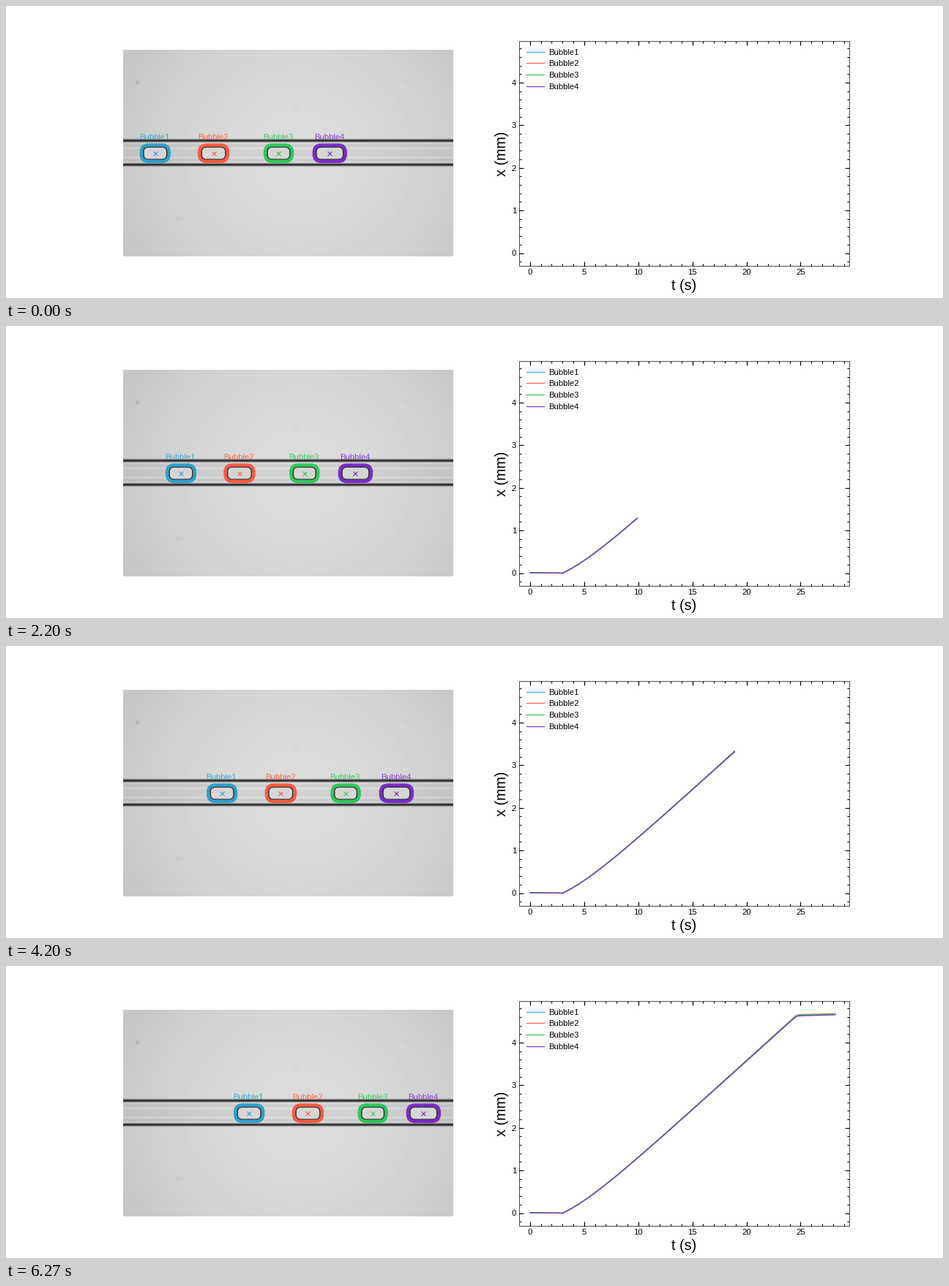
Recreate the animation shown at these times as a matplotlib script. Size 1280 by 400 pixels, loop 6340 ms.

```python
import numpy as np
import matplotlib.pyplot as plt
from matplotlib.animation import FuncAnimation
from matplotlib.patches import FancyBboxPatch, Rectangle
from matplotlib.transforms import Affine2D

plt.rcParams["font.family"] = "Liberation Sans"

LOOP, POSES, SUB, DT = 6340, 95, 3, 0.3  # SUB: ticks of the clock per pose
VIEW_SCALE = 27.6                        # camera pixels per mm
PT = 0.72                                # points per pixel
SMALL, LARGE = 8.1, 14.2
LEFT, RIGHT, TOP, BOTTOM = 701.1, 1152, 48, 356

# colour, start x, half width of the outline, relative speed
BUBBLES = [
    ("#2f9fcb", 203.5, 18.9, 1.001),
    ("#fb5a43", 283.3, 19.4, 1.0045),
    ("#2fc758", 372.2, 18.4, 1.003),
    ("#7a2dc6", 442.0, 21.4, 0.9985),
]


def px(t):
    return LEFT + (t + 1) * 14.783


def py(mm):
    return 338.5 - mm * 58.4


def position(t):
    """Rest, lagging start at 3 s, constant speed, soft stop near 24.5 s."""
    run = np.maximum(t - 3, 0)
    drive = 0.229 * run - 0.325 * (1 - np.exp(-run / 2.9))
    limit = 4.635 + 0.007 * (t - 25)
    soft = 0.015
    rest = 0.01 * np.maximum(1 - t / 3, 0)
    return rest - soft * np.logaddexp(-drive / soft, -limit / soft)


def photo():
    """Grey microscope view with a horizontal glass channel."""
    y, x = np.mgrid[60.5:343.5, 160.5:611.5]
    r2 = ((x - 400) / 240) ** 2 + ((y - 205) / 230) ** 2
    img = 220 - 20 * r2 / (1 + 0.12 * r2)

    def bell(c, s):
        return np.exp(-((y - c) / s) ** 2)

    off = np.abs(y - 201.2)
    img -= 10 * (off < 16)
    img += 14 * np.exp(-((off - 6.5) / 0.9) ** 2)
    img += 12 * np.exp(-((off - 13) / 1.1) ** 2)
    img -= 6 * np.exp(-((off - 10) / 1.6) ** 2)
    for wall in (184.4, 217.4):
        img *= 1 - 0.84 * bell(wall, 1.8)
    for cx, cy, width, depth in [(179.5, 105, 2, 32), (236, 291, 6, 13),
                                 (549, 104, 3, 7), (396, 139, 4, 6)]:
        img -= depth * np.exp(-((x - cx) / width) ** 2) * bell(cy, 2)
    return img


fig = plt.figure(figsize=(12.8, 4), dpi=100, facecolor="white")
stage = fig.add_axes([0, 0, 1, 1])
stage.axis("off")
stage.imshow(photo(), cmap="gray", vmin=0, vmax=255, aspect="auto",
             extent=(160, 611, 343, 60), interpolation="nearest")


def draw_ticks(step, length):
    xs = px(np.arange(0, 29.5, step[0]))
    ys = py(np.arange(0, 4.96, step[1]))
    style = dict(color="black", lw=0.8)
    stage.vlines(xs, BOTTOM - length, BOTTOM, **style)
    stage.vlines(xs, TOP, TOP + length, **style)
    stage.hlines(ys, LEFT, LEFT + length, **style)
    stage.hlines(ys, RIGHT - length, RIGHT, **style)


def draw_plot_frame():
    stage.add_patch(Rectangle((LEFT, TOP), RIGHT - LEFT, BOTTOM - TOP,
                              fc="none", ec="black", lw=0.5))
    draw_ticks((1, 0.2), 2.8)
    draw_ticks((5, 1), 5.6)
    stage.hlines(py(-0.2), LEFT, LEFT + 2.8, color="black", lw=0.8)
    stage.hlines(py(-0.2), RIGHT - 2.8, RIGHT, color="black", lw=0.8)
    for t in range(0, 30, 5):
        stage.text(px(t), 368, str(t), size=SMALL, ha="center")
    for mm in range(5):
        stage.text(697, py(mm) + 4, str(mm), size=SMALL, ha="right")
    stage.text(926.5, 389, "t (s)", size=LARGE, ha="center")
    stage.text(687, 202, "x (mm)", size=LARGE, rotation=90, ha="right", va="center")


def outline(cx, half_w, half_h, radius, **style):
    box = FancyBboxPatch((cx - half_w, 201.7 - half_h), 2 * half_w, 2 * half_h,
                         boxstyle=f"round,pad=0,rounding_size={radius}", **style)
    return stage.add_patch(box)


def make_bubble(name, color, cx, half_w):
    shift = Affine2D()
    parts = [
        outline(cx, half_w - 2.5, 9, 7, fc="#d6d6d6", ec="#343434", lw=2.6 * PT),
        outline(cx, half_w, 11.1, 9.5, fc="none", ec=color, lw=4.5 * PT),
        stage.plot(cx, 202, "x", color=color, ms=4.6, mew=0.8)[0],
        stage.text(cx - 0.8, 183.3, name, color=color, size=SMALL, ha="center",
                   alpha=0.88),
    ]
    for part in parts:
        part.set_transform(shift + stage.transData)
    return shift


draw_plot_frame()
shifts, curves = [], []
for i, (color, cx, half_w, _) in enumerate(BUBBLES):
    name, row = f"Bubble{i + 1}", 62.6 + 15.8 * i
    line = dict(color=color, lw=0.95, alpha=0.93)
    shifts.append(make_bubble(name, color, cx, half_w))
    curves.append(stage.plot([], [], **line)[0])
    stage.plot([711.3, 734.5], [row, row], **line)
    stage.text(740.8, row + 4, name, size=SMALL)
stage.set(xlim=(0, 1280), ylim=(400, 0))


def update(tick):
    pose = min((tick + 1) // SUB, POSES - 1)
    t = np.arange(pose + 1) * DT
    for (*_, speed), shift, curve in zip(BUBBLES, shifts, curves):
        mm = position(t) * speed
        shift.clear().translate(mm[-1] * VIEW_SCALE, 0)
        curve.set_data(px(t), py(mm))
    return curves


anim = FuncAnimation(fig, update, frames=POSES * SUB, interval=LOOP / (POSES * SUB),
                     repeat=True, repeat_delay=0, blit=False)
plt.show()
```
